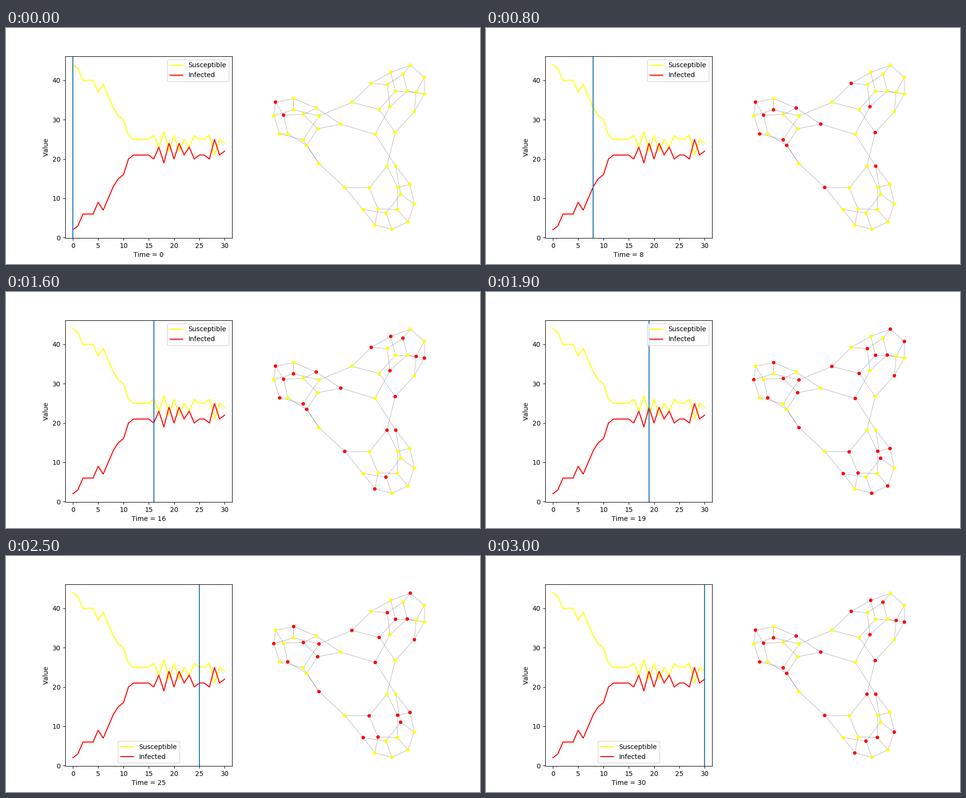
A matplotlib script for the animation above (3.1 s loop, 1000 px wide and 500 px high).

```python
import matplotlib.pyplot as plt
import numpy as np
from matplotlib.animation import FuncAnimation
from matplotlib.collections import LineCollection

plt.rcParams["text.kerning_factor"] = 6  # whole-pixel kerning

STEPS, INTERVAL = 31, 100
INFECTED = np.array([2, 3, 6, 6, 6, 9, 7, 10, 13, 15, 16, 20, 21, 21, 21, 21,
                     20, 23, 19, 24, 20, 24, 21, 23, 20, 21, 21, 20, 25, 21, 22])

# A hub and three 15-node lobes that share one wiring pattern.
HUB = [(779, 225.5)]
LEFT = [(706.3, 203.6), (657.5, 213.4), (634.5, 248.6), (660.3, 287.3), (627, 237),
        (660.3, 186.3), (606.5, 173.3), (607, 149.5), (654.5, 169.5), (627.3, 183.3),
        (585.7, 184.6), (594.5, 224.3), (577.4, 224.3), (565, 185.7), (568.6, 157)]
TOP = [(810, 166.7), (804.6, 120), (770.5, 117.3), (729.7, 157.6), (787.2, 172.5),
       (821, 221.6), (861.6, 177.3), (882.6, 140), (846.4, 133.5), (837.5, 97.8),
       (853, 78.7), (811.7, 94), (821.8, 134), (865.3, 136.5), (882.6, 104.8)]
BOTTOM = [(822.3, 292.8), (852.3, 331.6), (826.3, 337.3), (803.7, 292.8), (766.2, 338.6),
          (714.6, 337.7), (753.5, 384.7), (801.6, 392.2), (832.5, 352.2), (861.3, 373.1),
          (847.5, 410.9), (825.6, 384.4), (784.9, 383.5), (778, 417.3), (813.8, 426.3)]
POS = np.array(HUB + LEFT + TOP + BOTTOM)
COUNT, LOBE = len(POS), len(LEFT)

SEEDS = (11, 15)
PARITY_SWITCH = (LOBE, 4, 2)  # where each lobe's alternation flips


def build_edges():
    outer = [(i, (i + 1) % 9) for i in range(9)]
    inner = [(10 + i, 10 + (i + 1) % 5) for i in range(5)]
    spokes = [(9, 1), (9, 8), (9, 10), (11, 2), (12, 4), (13, 6), (14, 7)]
    edges = []
    for k in range(3):
        start, following = 1 + k * LOBE, 1 + (k + 1) % 3 * LOBE
        edges += [(start + a, start + b) for a, b in outer + inner + spokes]
        edges += [(0, start), (start + 5, following + 3)]
    return edges


def distances(edges):
    """Number of steps from the nearest seed to every node."""
    dist = np.full(COUNT, COUNT)
    dist[list(SEEDS)] = 0
    for _ in range(COUNT):
        for a, b in edges:
            dist[a] = min(dist[a], dist[b] + 1)
            dist[b] = min(dist[b], dist[a] + 1)
    return dist


def on_even_steps(node):
    """Neighbours take turns being infected; the hub joins the odd steps."""
    if node == 0:
        return False
    lobe, i = divmod(node - 1, LOBE)
    return i % 2 == int(i >= PARITY_SWITCH[lobe])


EDGES = build_edges()
DISTANCE = distances(EDGES)
EVEN = np.array([on_even_steps(n) for n in range(COUNT)])


def infected_at(t):
    """The front spreads from the seeds through the nodes whose turn it is."""
    turn = EVEN if t % 2 == 0 else ~EVEN
    order = np.argsort(DISTANCE + COUNT * ~turn, kind="stable")
    state = np.zeros(COUNT, bool)
    state[order[:INFECTED[t]]] = True
    return state


fig = plt.figure(figsize=(10, 5), dpi=100)

chart = fig.add_subplot(121)
time = np.arange(STEPS)
chart.plot(time, COUNT - INFECTED, color="yellow", label="Susceptible")
chart.plot(time, INFECTED, color="red", label="Infected")
chart.set(xlim=(-1.5, 31.5), ylim=(-0.1, 46.1), ylabel="Value")
cursor = chart.axvline(0, color="tab:blue")
legend = chart.legend(loc="upper right")

network = fig.add_axes([0, 0, 1, 1])
network.set(xlim=(0, 1000), ylim=(500, 0))
network.axis("off")
network.add_collection(LineCollection([POS[list(e)] for e in EDGES],
                                      colors="black", linewidths=0.2, zorder=1))
nodes = network.scatter(*POS.T, s=15, linewidths=1.5, zorder=2)


def update(t):
    cursor.set_xdata([t, t])
    chart.set_xlabel(f"Time = {t}")
    # The legend steps aside once the cursor has cleared the lower centre.
    legend.set_loc("lower center" if t >= 22 else "upper right")
    colors = np.where(infected_at(t), "red", "yellow")
    nodes.set_facecolor(colors)
    nodes.set_edgecolor(colors)
    return cursor, nodes


animation = FuncAnimation(fig, update, frames=STEPS, interval=INTERVAL,
                          repeat=True, repeat_delay=0, blit=False)
plt.show()
```
